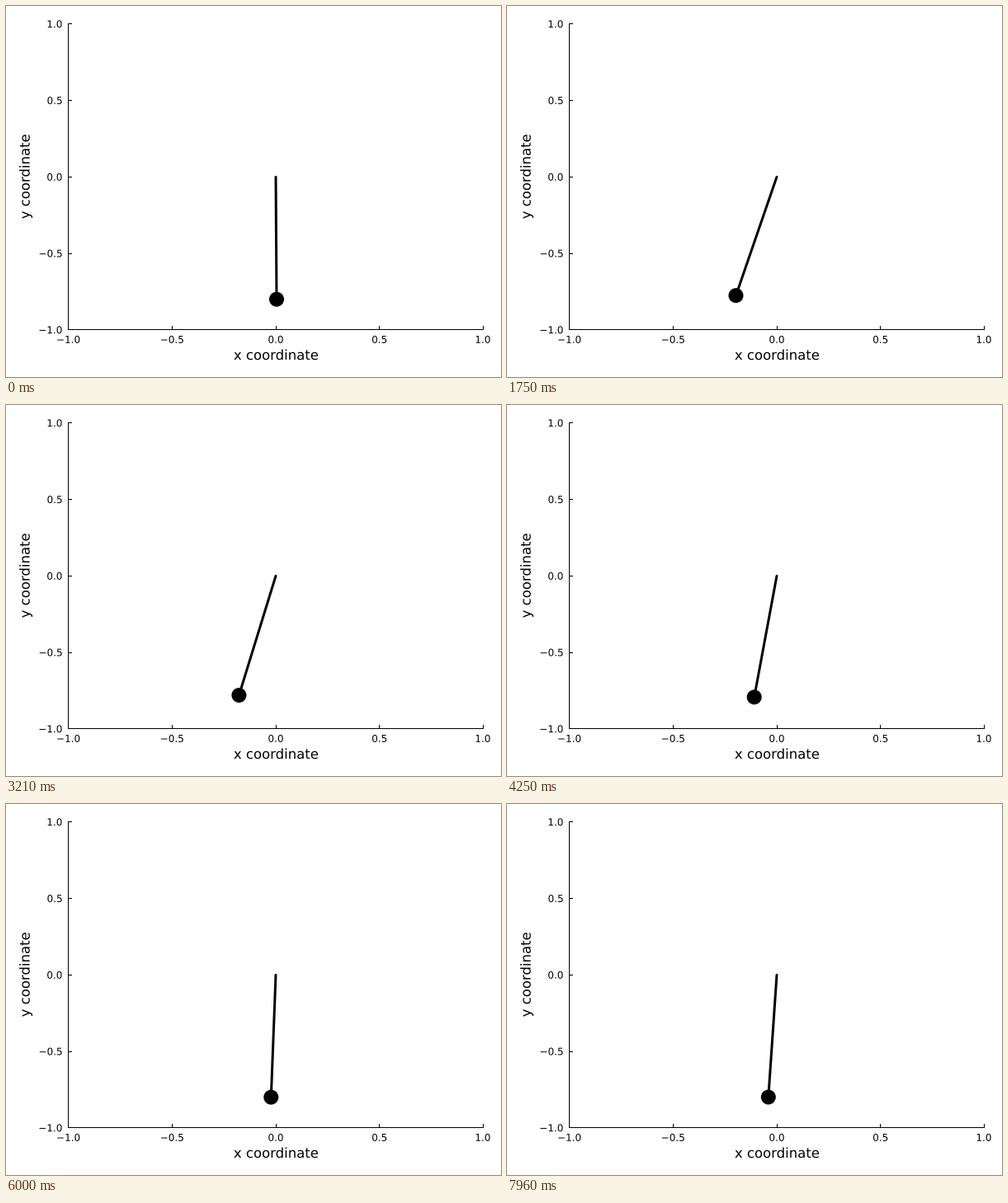
A matplotlib script that plays this animation: 600 by 450 pixels, repeating every 8000 ms.

```python
import math
import numpy as np
import matplotlib.pyplot as plt
from matplotlib.animation import FuncAnimation
from matplotlib.patches import Circle, PathPatch
from matplotlib.textpath import TextPath
from matplotlib.transforms import Affine2D

W, H, DPI = 600, 450, 100
FRAMES, LOOP_MS = 192, 8000
PX = 72 / DPI                 # points per pixel
CX, CY = 327.0, 207.3         # pivot
SX, SY = 251.2, 185.5         # pixels per data unit
LENGTH = 0.8
TICK_SIZE, LABEL_SIZE = 12, 16.5

# Turning points of the pushed pendulum: frame, offset in pixels
SWING = [(0, 1), (3, -13.5), (11, 125), (20, 56), (27, 19), (43, -50),
         (65, 23), (74, -51), (91, 27), (104, -31), (130, 31),
         (151.5, -20), (160.5, 19.5), (181, 35), (196, -26)]


def smooth_path(keys, t):
    """Cubic through the keys, level at every turn."""
    x, y = np.array(keys, float).T
    h = np.diff(x)
    d = np.diff(y) / h
    a, b = d[:-1], d[1:]
    m = np.zeros_like(y)
    m[1:-1] = np.where(a * b > 0, 2 * a * b / (a + b), 0)
    i = np.searchsorted(x, t, side="right") - 1
    s = (t - x[i]) / h[i]
    ease = s * s * (3 - 2 * s)
    return (y[i] + (y[i + 1] - y[i]) * ease
            + h[i] * s * (1 - s) * (m[i] * (1 - s) - m[i + 1] * s))


offsets = smooth_path(SWING, np.arange(FRAMES))
swing = np.arcsin(offsets / (SX * LENGTH))

plt.rcParams["font.family"] = "DejaVu Sans"
fig = plt.figure(figsize=(W / DPI, H / DPI), dpi=DPI, facecolor="white")
ax = fig.add_axes([0, 0, 1, 1])
ax.set_xlim(0, W)
ax.set_ylim(H, 0)
ax.axis("off")


def stroke(xs, ys, width=1, cap="projecting"):
    return ax.plot(xs, ys, color="black", lw=width * PX,
                   solid_capstyle=cap)[0]


def label(x, y, text, size, align=0.5, angle=0):
    """Outlined text on baseline (x, y); align 0 is left, 1 is right."""
    path = TextPath((0, 0), text, size=size)
    box = path.get_extents()
    place = (Affine2D().translate(-box.x0 - align * box.width, 0)
             .scale(1, -1).rotate_deg(angle).translate(x, y))
    ax.add_patch(PathPatch(place.transform_path(path), facecolor="black",
                           lw=0, snap=False))


left, right = math.floor(CX - SX), math.floor(CX + SX)
top, bottom = math.floor(CY - SY), math.floor(CY + SY)
stroke([left, right], [bottom, bottom])
stroke([left, left], [bottom, top])
for v in (-1, -0.5, 0, 0.5, 1):
    x, y = CX + v * SX, CY - v * SY
    tx, ty = math.floor(x), math.floor(y)
    name = f"{v:.1f}".replace("-", "\u2212")
    stroke([tx, tx], [bottom, bottom - 4])
    stroke([left, left + 4], [ty, ty])
    label(x, 408.8, name, TICK_SIZE)
    label(67.6, y + 4.4, name, TICK_SIZE, align=1)
label(CX + 0.2, 429, "x coordinate", LABEL_SIZE)
label(28.6, CY - 0.3, "y coordinate", LABEL_SIZE, angle=-90)

rod = stroke([CX, CX], [CY, CY], 3, "round")
bob = ax.add_patch(Circle((CX, CY), 9, facecolor="black", lw=0))


def update(i):
    x = CX + SX * LENGTH * math.sin(swing[i])
    y = CY + SY * LENGTH * math.cos(swing[i])
    rod.set_data([CX, x], [CY, y])
    bob.center = x, y
    return rod, bob


anim = FuncAnimation(fig, update, frames=FRAMES, interval=LOOP_MS / FRAMES,
                     repeat=True, repeat_delay=0)
plt.show()
```
